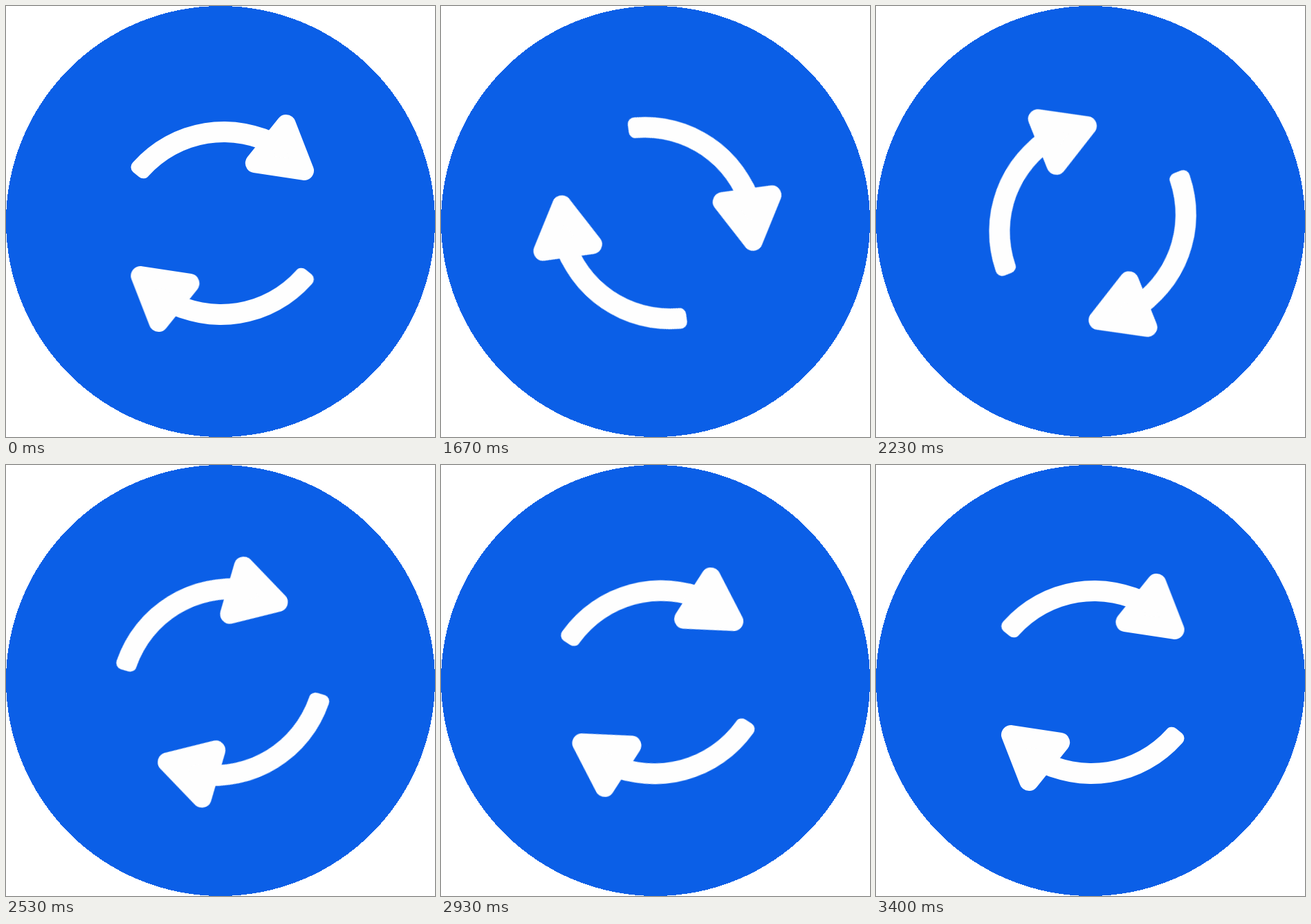
Animation of 620 by 623 pixels, one loop 3610 ms. Source, as an HTML page without scripts:

```html
<!DOCTYPE html>
<html lang="en">
<head>
<meta charset="utf-8">
<title>Refresh</title>
<style>
  html, body { margin: 0; width: 100%; height: 100%; overflow: hidden; background: #fff; }
  svg { display: block; width: 620px; height: 623px; }
  .disc { fill: #0b5fe7; shape-rendering: crispEdges; }
  .arrow { fill: #fefefe; }
  .head { stroke: #fefefe; stroke-width: 28; stroke-linejoin: round; }
  .spin {
    transform-origin: 313px 314px;
    animation: spin 3610ms infinite;
  }
  /* half a turn, overshooting and settling, at 25 poses a second */
  @keyframes spin {
    0% { transform: rotate(0deg); animation-timing-function: linear; }
    38.504% { transform: rotate(0deg); animation-timing-function: steps(35, jump-start); }
    77.285% { transform: rotate(190deg); animation-timing-function: steps(5, jump-start); }
    82.825% { transform: rotate(170deg); animation-timing-function: steps(5, jump-start); }
    88.366% { transform: rotate(183.5deg); animation-timing-function: steps(6, jump-start); }
    95.014%, 100% { transform: rotate(180deg); }
  }
</style>
</head>
<body>
<svg viewBox="0 0 620 623">
  <defs>
    <g id="arrow" class="arrow">
      <path d="M183.2 226.3A176 176 0 0 1 403 190.6L388 216.6A146 146 0 0 0 206.2 245.5A9.5 9.5 0 0 1 192.2 246.9L183.6 239.9A9.5 9.5 0 0 1 183.2 226.3Z"/>
      <path class="head" d="M431 238L359.8 227.1L404.8 170.9Z"/>
    </g>
  </defs>
  <ellipse class="disc" cx="310" cy="311.5" rx="310" ry="311.5"/>
  <g class="spin">
    <use href="#arrow"/>
    <use href="#arrow" transform="rotate(180 312.7 314)"/>
  </g>
</svg>
</body>
</html>
```
